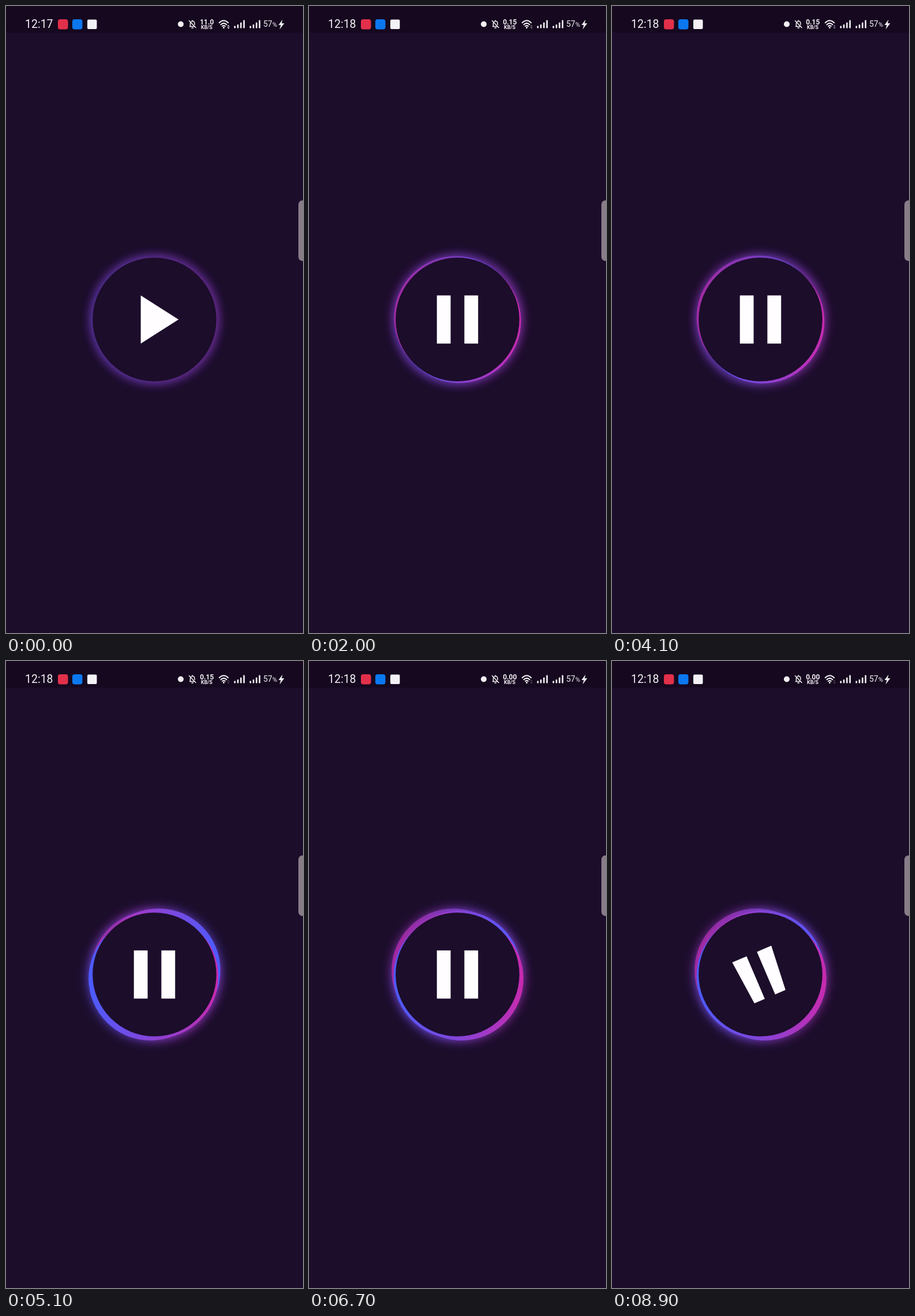
An HTML page for the animation above (9 s loop, 515 by 1087 pixels).

```html
<!DOCTYPE html>
<html lang="en">
<head>
<meta charset="utf-8">
<title>Play button</title>
<style>
  html, body { margin: 0; width: 100%; height: 100%; overflow: hidden; background: #1c0d2b; }
  svg { display: block; width: 515px; height: 1087px; }
  text { font-family: Roboto, sans-serif; fill: #f4f1f6; }
  .bold { font-weight: 700; text-anchor: middle; }
  .line { fill: none; stroke: #f4f1f6; stroke-linecap: round; stroke-linejoin: round; }
  .white { fill: #f4f1f6; }
</style>
</head>
<body>
<svg viewBox="0 0 515 1087">
  <defs>
    <linearGradient id="pinkBlue"><stop stop-color="#c72aae"/><stop offset="1" stop-color="#4a5cff"/></linearGradient>
    <linearGradient id="bluePink"><stop stop-color="#4a5cff"/><stop offset="1" stop-color="#c72aae"/></linearGradient>
    <filter id="blur" x="-40%" y="-40%" width="180%" height="180%" color-interpolation-filters="sRGB">
      <feGaussianBlur stdDeviation="10"/>
    </filter>
  </defs>

  <rect width="515" height="46" fill="#15081f"/>
  <rect x="507" y="337" width="20" height="105" rx="7" fill="#887c88"/>

  <text id="clock" x="33" y="38" font-size="19.5"></text>
  <rect x="90" y="23" width="17.5" height="17.5" rx="4" fill="#e2304a"/>
  <rect x="115" y="23" width="17.5" height="17.5" rx="4" fill="#0b78f0"/>
  <rect x="141" y="23.500" width="16.500" height="16.500" rx="2" class="white"/>

  <circle cx="303" cy="31.500" r="5" class="white"/>
  <g class="line" stroke-width="1.500">
    <path d="M318.500 35.500h8.500M319.500 35v-4.500c0-1 .3-2 .8-2.700M321.500 27c3-2 5.500 0 5.500 3.500v2M323 25v1M317.500 25.500l11.500 12"/>
    <path d="M322 38h2.500"/>
  </g>
  <text id="rate" class="bold" x="348.300" y="31.500" font-size="12"></text>
  <text class="bold" x="348" y="39.500" font-size="8.800">KB/S</text>
  <g class="line" stroke-width="2">
    <path d="M369.800 29Q377.500 21.500 385.200 29M372.500 32.300Q377.500 27.500 382.500 32.300M375 35Q377.500 33 380 35"/>
  </g>
  <circle cx="377.500" cy="37.500" r="1.500" class="white"/>
  <path id="traffic" class="white" d="M383.500 35.500l2.200-2.500 2.200 2.500zM383.500 37l2.200 2.500 2.200-2.500z"/>
  <g id="signal" class="white"></g>
  <text x="446" y="36" font-size="14">57<tspan font-size="11.500">%</tspan></text>
  <path class="white" d="M479.500 23.500L472.500 33h4l-2 7.500 8-10.500h-4.500z"/>

  <g id="glows"></g>
  <g id="rings"></g>
  <circle cx="257.500" cy="543.500" r="107.300" fill="#1c0d2b"/>
  <path id="icon" fill="#fffdff"/>
</svg>
<script>
const LOOP = 9000, STEP = 100, CX = 257.5, CY = 543.5, UNIT = 2.98;
const $ = id => document.getElementById(id);
const mix = (a, b, p) => a + (b - a) * p;
const clamp = x => Math.min(1, Math.max(0, x));

function add(parent, name, attrs) {
  const el = document.createElementNS('http://www.w3.org/2000/svg', name);
  for (const key in attrs) el.setAttribute(key, attrs[key]);
  return $(parent).appendChild(el);
}

for (const x of [395.5, 422.5])
  [4, 6.5, 10, 14].forEach((h, i) =>
    add('signal', 'rect', { x: x + i * 5.3, y: 38.5 - h, width: 2.6, height: h, rx: 0.8 }));

// Each ring slides along its own diagonal.
const rings = [
  { dx: -1, dy: -1, fill: 'pinkBlue', alpha: 0.68, pair: 1 },
  { dx: 1, dy: -1, fill: 'pinkBlue', alpha: 1, pair: 0 },
  { dx: -1, dy: 1, fill: 'bluePink', alpha: 1, pair: 0 },
  { dx: 1, dy: 1, fill: 'bluePink', alpha: 1, pair: 1 }
];
for (const ring of rings) {
  const attrs = { r: 107.3, cx: CX, cy: CY, fill: `url(#${ring.fill})` };
  ring.glow = add('glows', 'circle', { ...attrs, filter: 'url(#blur)' });
  ring.edge = add('rings', 'circle', { ...attrs, opacity: ring.alpha });
}

// Swing of each diagonal pair: [time, distance].
const swings = [
  [[2050, 0], [3100, 7], [4100, 0], [5100, 7], [6300, 0], [7100, 7], [7800, 0], [8900, 3.5]],
  [[1700, 0], [2400, 7], [3800, 0], [4400, 7], [5800, 0], [6700, 7], [7600, 0], [8900, 7]]
];
function swing(keys, t) {
  if (t <= keys[0][0]) return 0;
  const i = keys.findIndex(key => key[0] >= t);
  const [t0, v0] = keys[i - 1], [t1, v1] = keys[i];
  const p = (t - t0) / (t1 - t0);
  return mix(v0, v1, p * p * (3 - 2 * p));
}

// Half of the icon before rotation, as triangle (0) or bar (1).
const half = { play: [[-14, -8], [0, -8], [0, 14], [0, 14]],
               pause: [[-12, -14], [-4, -14], [-4, 14], [-12, 14]] };
function iconPath(q) {
  return [1, -1].map(side => 'M' + half.play.map(([x, y], i) => {
    const [px, py] = half.pause[i];
    return `${side * mix(x, px, q)} ${mix(y, py, q)}`;
  }).join('L') + 'Z').join('');
}

function draw(t) {
  $('clock').textContent = t < 800 ? '12:17' : '12:18';
  $('rate').textContent = t < 1800 ? '11.0' : t < 5800 ? '0.15' : '0.00';
  $('traffic').setAttribute('opacity', t < 500 ? 1 : t < 4900 ? 0.5 : 0.25);

  const shift = swings.map(keys => swing(keys, t));
  for (const { dx, dy, pair, alpha, glow, edge } of rings) {
    const d = shift[pair];
    const move = `translate(${dx * d} ${dy * d})`;
    glow.setAttribute('transform', move);
    glow.setAttribute('opacity', alpha * (0.38 + 0.24 * clamp(d / 3.5)));
    edge.setAttribute('transform', move);
    edge.setAttribute('visibility', d > 0 ? 'visible' : 'hidden');
  }

  const q = clamp((t - 1450) / 400) - clamp((t - 8828) / 400);
  $('icon').setAttribute('d', iconPath(q));
  $('icon').setAttribute('transform',
    `translate(${CX} ${CY}) rotate(${-90 * (1 - q ** 1.5)}) scale(${UNIT})`);
}

let start;
function tick(now) {
  start ??= now;
  draw(Math.floor((now - start) % LOOP / STEP) * STEP);
  requestAnimationFrame(tick);
}
draw(0);
requestAnimationFrame(tick);
</script>
</body>
</html>
```
